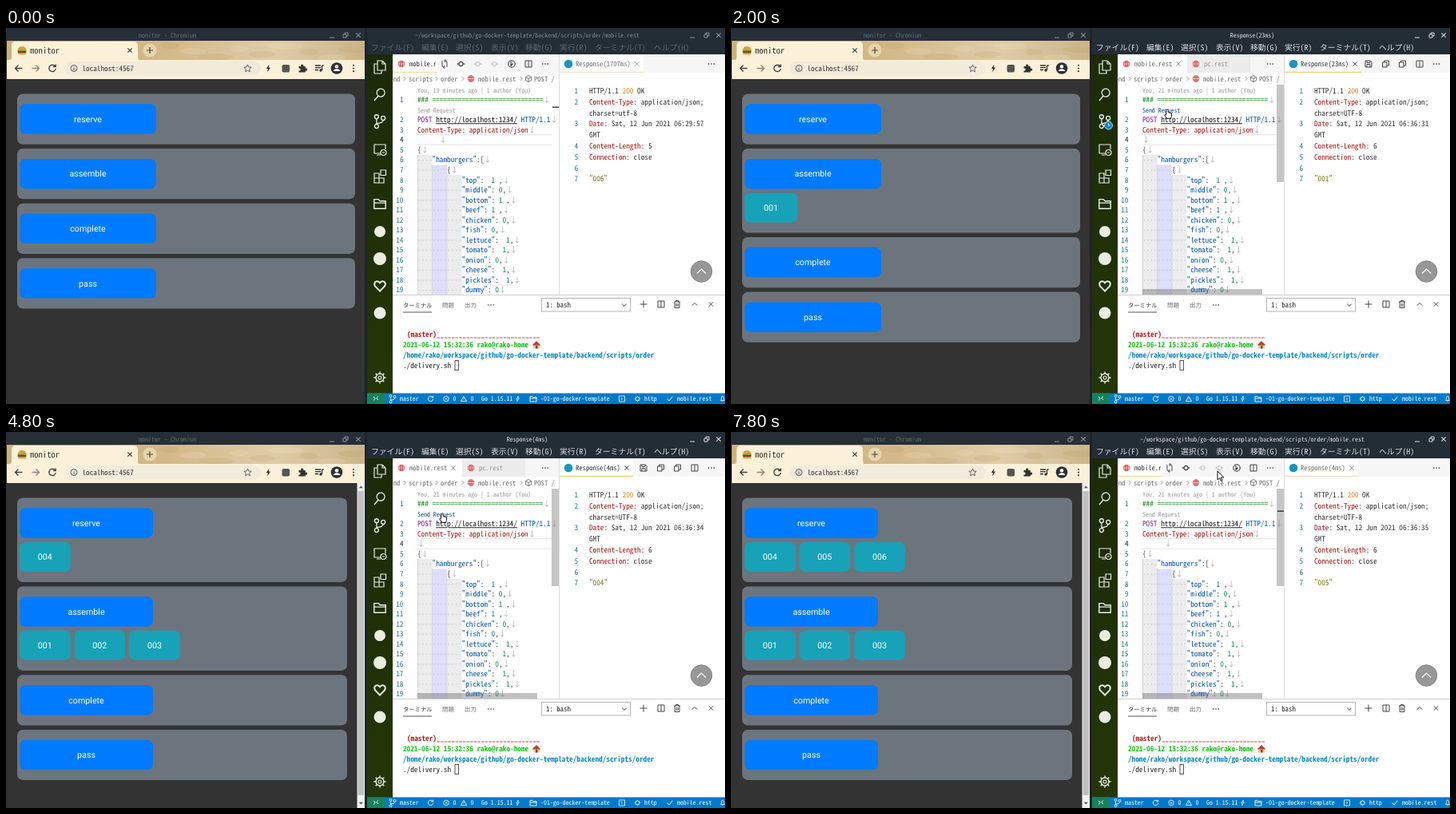
These frames come from a looping animation (900 by 471 pixels, 8 s). An HTML page:

```html
<!DOCTYPE html>
<html lang="ja">
<head>
<meta charset="utf-8">
<title>monitor</title>
<style>
html, body { margin: 0; width: 100%; height: 100%; overflow: hidden; background: #23262d; }
svg { display: block; width: 100vw; height: 100vh; }
text { white-space: pre; text-rendering: geometricPrecision;
  font-family: "Noto Sans Mono CJK JP", "Noto Sans Mono", "DejaVu Sans Mono", monospace; }
.cjk { font-family: "Noto Sans Mono CJK JP", "Noto Sans CJK JP", "Noto Sans CJK", sans-serif; }
.ui { font-family: Roboto, sans-serif; }
</style>
</head>
<body>
<svg viewBox="0 0 900 471" preserveAspectRatio="none">
  <defs>
    <linearGradient id="strip">
      <stop offset="0" stop-color="#cdb07c"/><stop offset=".45" stop-color="#d2b988"/>
      <stop offset=".75" stop-color="#dfcda8"/><stop offset="1" stop-color="#cbb58a"/>
    </linearGradient>
    <linearGradient id="olive" x2="0" y2="1">
      <stop offset="0" stop-color="#1c2b05"/><stop offset="1" stop-color="#243606"/>
    </linearGradient>
    <clipPath id="editorClip"><rect x="484" y="56" width="208" height="278"/></clipPath>
    <clipPath id="codeClip"><rect x="484" y="71" width="206" height="263"/></clipPath>
    <clipPath id="tabClip"><rect x="484" y="33" width="54" height="23"/></clipPath>
    <clipPath id="responseClip"><rect x="693" y="33" width="72" height="23"/></clipPath>
  </defs>
  <g id="base"></g>
  <g id="live"></g>
</svg>
<script>
const LOOP = 8000, STEP = 200;
const CODE = 4.63, SMALL = 3.95, TAB = 4.3;
const BLUE = '#0451a5', RED = '#a31515', GREY = '#6b6b6b', TEAL = '#237893';

// Font size is derived from the wanted column width of the monospaced face.
const pen = document.createElement('canvas').getContext('2d');
pen.font = '100px "Noto Sans Mono CJK JP", "Noto Sans Mono", "DejaVu Sans Mono", monospace';
const advance = pen.measureText('0').width / 100;

const text = (x, y, size, str, fill, extra = '') =>
  `<text x="${x}" y="${y + size * .36}" font-size="${size}" fill="${fill}" ${extra}>${str}</text>`;
const mono = (x, y, pitch, str, fill = '#222', extra = '') => text(x, y, pitch / advance, str, fill, extra);
const runs = (x, y, pitch, ...parts) =>
  mono(x, y, pitch, parts.map(([s, c, e = '']) => `<tspan fill="${c}" ${e}>${s}</tspan>`).join(''));
const cjk = (x, y, size, str, fill) => text(x, y, size, str, fill, 'class="cjk"');
const label = (x, y, str) => text(x, y, 10.7, str, '#fff', 'class="ui" text-anchor="middle"');
const rect = (x, y, w, h, fill, r = 0, extra = '') =>
  `<rect x="${x}" y="${y}" width="${w}" height="${h}" rx="${r}" fill="${fill}" ${extra}/>`;
const dot = (x, y, r, fill, extra = '') => `<circle cx="${x}" cy="${y}" r="${r}" fill="${fill}" ${extra}/>`;
const icon = (x, y, d, stroke = '#444', width = 1, fill = 'none') =>
  `<path transform="translate(${x} ${y})" d="${d}" stroke="${stroke}" stroke-width="${width}" fill="${fill}"/>`;
const clip = (id, body) => `<g clip-path="url(#${id})">${body}</g>`;

const D = {
  cross: 'M-2.7-2.7l5.4 5.4m0-5.4l-5.4 5.4',
  split: 'M-4-4h8v8h-8zM0-4v8',
  more: 'M-4 0h1.4m1.9 0h1.4m1.9 0h1.4',
  up: 'M-3.2 1.6L0-1.6 3.2 1.6',
  down: 'M-2.8-1.4L0 1.4 2.8-1.4',
  right: 'M-1.2-2.4l2.4 2.4-2.4 2.4',
  commit: 'M-5 0h2.4m5.2 0h2.4M-2.6 0a2.6 2.6 0 1 0 5.2 0a2.6 2.6 0 1 0-5.2 0',
  compare: 'M-3-4v6q0 2 2 2h2M3 4v-6q0-2-2-2h-2M0 2.3l-1.8 1.8 1.8 1.6M0-5.7l1.8 1.6L0-2.3',
  fork: 'M-4.2 0a4.2 4.2 0 1 0 8.4 0a4.2 4.2 0 1 0-8.4 0M-1-3v6m0-1l2.6-2.5',
  save: 'M-4-4h6.5l1.5 1.5v6.5h-8zM-2-4v2.5h4v-2.5M-2 4v-3.5h4v3.5',
  copy: 'M-4-2h5.5v6h-5.5zM-2-2v-2h6v6h-2.5',
  branch: 'M-2.5-1.8v4M2.5-1q0 2.4-5 2.6M-4-3.5a1.5 1.5 0 1 0 3 0a1.5 1.5 0 1 0-3 0M1-2.5a1.5 1.5 0 1 0 3 0a1.5 1.5 0 1 0-3 0M-4 3.7a1.5 1.5 0 1 0 3 0a1.5 1.5 0 1 0-3 0',
  folder: 'M-4-3h3l1 1.2h4v5.3h-8zM-4-.5h8',
  gear: 'M-3 0a3 3 0 1 0 6 0a3 3 0 1 0-6 0M0-4.6v1.6M0 3v1.6M-4.6 0h1.6M3 0h1.6M-3.2-3.2l1 1M2.2 2.2l1 1M-3.2 3.2l1-1M2.2-2.2l1-1',
  reload: 'M3.5-2.5a4.2 4.2 0 1 0 .7 3M4.2-5v3h-3',
  bolt: 'M1-5l-3.6 5.6h2.2l-1 4.4 3.8-6h-2.3z',
  cube: 'M0-4l3.6 2v4L0 4l-3.6-2v-4zM-3.6-2L0 0l3.6-2M0 0v4'
};
const globe = (x, y) => dot(x, y, 4.2, '#d33d3d') +
  icon(x, y, 'M-4 0h8M0-4v8M-2-3.4q-1.6 3.4 0 6.8M2-3.4q1.6 3.4 0 6.8', '#fff', .6);
const windowButtons = (a, b, c, color) => icon(a, 11, 'M-3 1h6', color) +
  icon(b, 9, 'M-3-1h4v4h-4zM-1-1v-2h4v4h-2', color) + icon(c, 9, D.cross, color, 1.1);

function browserBase() {
  let s = rect(0, 0, 450, 18, '#262f38') +
    mono(166, 9, 4, 'monitor - Chromium', '#606a76') + windowButtons(408, 425, 441, '#8a909a') +
    rect(1, 16, 448, 25, 'url(#strip)');
  for (let i = 0; i < 9; i++)
    s += `<ellipse cx="${205 + i * 29}" cy="${22 + i * 7 % 17}" rx="${12 + i % 3 * 5}" ry="4" fill="${i % 2 ? '#efe0c0' : '#b99a66'}" opacity=".2"/>`;
  s += `<path d="M3 41q4 0 4-5v-14q0-5 5-5h148q5 0 5 5v14q0 5 4 5z" fill="#fbf1d9"/>` +
    rect(1, 40, 448, 24, '#fbf1d9') +
    icon(20, 28, 'M-5-.5q0-4.5 5-4.5t5 4.5z', 'none', 0, '#e59a35') + rect(14.5, 27.3, 11, 1.8, '#6aa336') +
    rect(14.7, 29, 10.6, 2, '#7b3e1c') + rect(15, 31, 10, 2.2, '#e59a35', 1) +
    mono(30, 28, 5.3, 'monitor', '#333') + icon(155, 28, D.cross, '#333', 1.1) +
    dot(180, 28, 8.5, '#e8d4ac') + icon(180, 28, 'M-4 0h8M0-4v8', '#444', 1.2) +
    icon(16, 50.5, 'M4.5 0h-9m4-4l-4 4 4 4', '#444', 1.4) +
    icon(37, 50.5, 'M-4.5 0h9m-4-4l4 4-4 4', '#8d8779', 1.4) + icon(58, 50.5, D.reload, '#444', 1.4) +
    rect(73, 42, 246, 17.5, '#f2ebdc', 8.7) +
    dot(85, 50.5, 4, 'none', 'stroke="#555"') + icon(85, 50.5, 'M0-2.2v1M0-.4v2.8', '#555') +
    mono(95.5, 50.5, 4.6, 'localhost:4567', '#333') +
    icon(302.5, 50.5, 'M0-4.6l1.3 3.1 3.3.3-2.5 2.2.8 3.3L0 2.6l-2.9 1.7.8-3.3-2.5-2.2 3.3-.3z', '#555', .9) +
    icon(328.5, 50.5, D.bolt, 'none', 0, '#222') + rect(345.5, 46, 9.5, 9.5, '#555', 2) +
    icon(371, 50.5, 'M-4.5-2.5h2.7a1.7 1.7 0 1 1 3 0h2.6v2.8a1.6 1.6 0 1 1 0 2.8v2h-8.3v-2.3a1.5 1.5 0 1 0 0-2.7z', 'none', 0, '#333') +
    icon(392, 50.5, 'M-5-3.5h7M-5-.8h7M-5 2h4M3.5-3.5v6M3.5-3.5h2.2', '#333', 1.3) + dot(394, 53, 1.7, '#333') +
    dot(414, 50.5, 7.3, '#2d3036') + dot(414, 48.2, 2.2, '#fff') + icon(414, 54, 'M-4 0q0-2.7 4-2.7t4 2.7z', 'none', 0, '#fff') +
    [46.8, 50.5, 54.2].map(y => dot(435, y, 1.1, '#444')).join('') +
    rect(0, 64, 449, 407, '#333');
  return s + rect(449, 0, 3, 471, '#202329');
}

function activityBar() {
  const w = '#e9ede0', x = 468;
  return rect(452, 33, 32, 425, 'url(#olive)') +
    icon(x, 49, 'M-3-8h6l4 4v8h-10zM3-8v4h4M-3-4h-4v12h9v-4', w, 1.2) +
    icon(x, 83, 'M-2 2a5 5 0 1 1 4 1a5 5 0 0 1-4-1l-5 6', w, 1.3) +
    `<g transform="translate(${x} 117) scale(1.65)">${icon(0, 0, D.branch, w, .8)}</g>` +
    icon(x, 152, 'M1 5h-8v-11h14v6M-4 7h5M1 4a3.5 3.5 0 1 0 7 0a3.5 3.5 0 1 0-7 0M3 4h3', w, 1.2) +
    icon(x, 186, 'M-7-4h6v12h-6zM-1 2h6v6h-12v-6zM1-8h6.5v6.5h-6.5z', w, 1.2) +
    `<g transform="translate(${x} 220) scale(1.8)">${icon(0, 0, D.folder, w, .8)}</g>` +
    dot(x, 255, 7, w) + dot(x, 289, 8, w) +
    icon(x, 323, 'M0 6.5l-6-6q-2-4 1-5.8q3-1.4 5 1.6q2-3 5-1.6q3 1.8 1 5.8z', w, 2) +
    dot(x, 357, 7.5, w) +
    `<g transform="translate(${x} 438) scale(1.65)">${icon(0, 0, D.gear, w, .9)}${dot(0, 0, 1.2, 'none', `stroke="${w}" stroke-width=".7"`)}</g>`;
}

const row = n => 115 + 12.53 * (n - 2);

function code() {
  const items = ['top:  1 ,', 'middle: 0,', 'bottom: 1 ,', 'beef: 1 ,', 'chicken: 0,', 'fish: 0,', 'lettuce:  1,',
    'tomato:  1,', 'onion: 0,', 'cheese:  1,', 'pickles:  1,', 'dummy: 0'];
  const end = ['↓', '#aaa'], x = 515, ink = '#333';
  const indented = (n, columns, ...parts) =>
    `<path d="M${x + 1.8} ${row(n) + .5}h${CODE * columns - 2}" stroke="#b9b9b9" stroke-dasharray="1 ${CODE - 1}"/>` +
    runs(x + CODE * columns, row(n), CODE, ...parts, end);
  let s = rect(x, 159, 18.5, 175, '#ececec') + rect(533.5, 171.5, 18.5, 163, '#dedefb') + rect(552, 184, 18.5, 150, '#ececec') +
    icon(0, 0, 'M515.5 159v175M533.5 171v163M552 184v150', '#cfcfd6', .7) +
    icon(0, 0, 'M515 133.7h168M515 146.3h168', '#e4e4e4', 1);
  for (let n = 1; n < 20; n++)
    s += mono(497.5, n == 1 ? 90 : row(n), CODE, n, n == 4 ? '#0b216f' : TEAL, 'text-anchor="end"');
  s += runs(x, 90, CODE, ['### ' + '='.repeat(30), '#008000'], end) +
    runs(x, row(2), CODE, ['POST ', '#8b1a9b'], ['http://localhost:1234/', '#111', 'text-decoration="underline"'], [' HTTP/1.1', BLUE], end) +
    runs(x, row(3), CODE, ['Content-Type: application/json', RED], end) +
    indented(5, 0, ['{', '#555']) +
    indented(6, 4, ['"hamburgers"', BLUE], [':[', ink]) +
    indented(7, 8, ['{', ink]);
  items.forEach((item, i) => {
    const [, key, mid, digit, tail] = item.match(/(\w+)(: +)(\d)(.*)/);
    s += indented(8 + i, 12, [`"${key}"`, BLUE], [mid, ink], [digit, '#098658'], [tail, ink]);
  });
  return clip('codeClip', s);
}

function panel() {
  const home = '/home/rako/workspace/github/go-docker-template/backend/scripts/order';
  const bold = 'font-weight="700"';
  return rect(484, 334, 416, 124, '#fff') + icon(0, 0, 'M484 334.5h416', '#d0d0d0') +
    cjk(497, 347, 7.3, 'ターミナル', '#333') + icon(0, 0, 'M497 356h36', '#555') +
    cjk(546, 347, 7.5, '問題', GREY) + cjk(574, 347, 7.5, '出力', GREY) + icon(607, 347, D.more, '#555', 1.3) +
    rect(670.5, 338.5, 111, 16.5, '#fff', 0, 'stroke="#b4b4b4"') + mono(676, 347, 4.4, '1: bash') +
    icon(774, 347, D.down) + icon(798, 346, 'M-4.5 0h9M0-4.5v9') + icon(820, 346, D.split) +
    icon(840, 346, 'M-4-3h8M-1.5-3v-1.5h3v1.5M-3-3v7.5h6v-7.5M-1-1v4M1-1v4') + icon(862, 346, D.up) + icon(882.5, 346, D.cross) +
    mono(502, 383.5, CODE, '(master)' + '_'.repeat(28), '#b32020', bold) +
    mono(497, 396.8, CODE, '2021-06-12 15:32:36 rako@rako-home', '#18c418', bold) +
    rect(660, 396.5, 8, 5, '#e6c79a') + icon(664, 396, 'M-5.5 1.5L0-4 5.5 1.5z', 'none', 0, '#b5442f') + rect(663, 398, 2.5, 3.5, '#7a4a28') +
    mono(497, 409.8, CODE, home, '#0c8ac2', bold) +
    mono(497, 422.7, CODE, './delivery.sh') + rect(562, 416.5, 4.5, 12, 'none', 0, 'stroke="#555"');
}

function statusBar() {
  const y = 464.5, w = '#fff';
  const say = (x, str) => mono(x, y - .3, SMALL, str, w);
  return rect(452, 457.5, 448, 13.5, '#007acc') + rect(452, 457.5, 22, 13.5, '#16825d') +
    icon(463, y, 'M-3-2.5l2.3 2.2-2.3 2.2M3-3L.7-.8 3 1.4', w, .9) + icon(484, y, D.branch, w, .9) + say(493, 'master') +
    `<g transform="translate(531.5 ${y}) scale(.75)">${icon(0, 0, D.reload, w, 1.2)}</g>` +
    dot(551, y, 3.3, 'none', `stroke="${w}" stroke-width=".8"`) + icon(551, y, 'M-1.3-1.3l2.6 2.6m0-2.6l-2.6 2.6', w, .8) + say(559.5, '0') +
    icon(573, y, 'M0-3.3L3.6 3h-7.2zM0-1v2', w, .8) + say(581.5, '0') + say(595, 'Go 1.15.11') +
    icon(640.5, y, 'M.8-3.5l-2.6 4h1.6l-.7 3 2.7-4.2h-1.6z', w, .7) + icon(660, y, D.folder, w, .9) + say(669, '-01-go-docker-template') +
    icon(771, y, 'M-3.5-3.5h7v7h-7zM-1-1.6l1.6 1.6L-1 1.6', w, .8) +
    `<g transform="translate(790.5 ${y}) scale(.8)">${icon(0, 0, D.gear, w, 1)}</g>` + say(799, 'http') +
    icon(831, y, 'M-3.3 0l2.3 2.6 4.3-5.4', w, 1) + say(840, 'mobile.rest') +
    icon(897, y, 'M-2.5 2h5q-1-1-1-3q0-2.4-1.5-2.4t-1.5 2.4q0 2-1 3zM-.6 3.2h1.2', w, .8);
}

function editorBase() {
  return rect(452, 0, 448, 33, '#232d36') + rect(484, 33, 416, 302, '#fff') +
    clip('editorClip', mono(480.5, 63.5, TAB, 'end', GREY) +
      [499, 539, 572, 645].map(x => icon(x, 63.5, D.right, '#777', .8)).join('') +
      mono(504, 63.5, TAB, 'scripts', GREY) + mono(544, 63.5, TAB, 'order', GREY) + globe(582, 63.5) +
      mono(591, 63.5, TAB, 'mobile.rest', GREY) + icon(654, 63.5, D.cube, '#555', .8) + mono(661, 63.5, TAB, 'POST /', GREY)) +
    code() + dot(870.5, 305, 13.3, '#979797', 'stroke="#868686"') + icon(870.5, 305, 'M-5.5 2.5L0-3l5.5 5.5', '#fff', 1.2) +
    activityBar() + panel() + statusBar();
}

function monitor(orders) {
  const tight = orders > 3;
  const [cardW, buttonW, chipW, gap] = tight ? [413, 167, 63.5, 68.6] : [423, 171, 66, 70];
  const all = Array.from({ length: orders }, (_, i) => '00' + (i + 1));
  const chips = { reserve: all.slice(3), assemble: all.slice(0, 3), complete: [], pass: [] };
  let y = 82.5, s = '';
  for (const [name, ids] of Object.entries(chips)) {
    const h = ids.length ? 105.5 : 63.2;
    s += rect(14, y, cardW, h, '#6c757d', 7) + rect(17, y + 12.8, buttonW, 37.5, '#007bff', 7) +
      label(17 + buttonW / 2, y + 31.4, name);
    ids.forEach((id, i) => {
      s += rect(17 + gap * i, y + 55.4, chipW, 37, '#17a2b8', 7) + label(17 + gap * i + chipW / 2, y + 73.8, id);
    });
    y += h + 5.4;
  }
  if (tight) s += rect(439.5, 64, 9.5, 407, '#f1f1f1') + rect(440.5, 74, 7.5, 381, '#c1c1c1') +
    icon(444.3, 69, 'M-2.5 1.3L0-1.4l2.5 2.7z', 'none', 0, '#555') + icon(444.3, 465, 'M-2.5-1.3L0 1.4l2.5-2.7z', 'none', 0, '#555');
  return s;
}

function header(title, focused) {
  const color = focused ? '#d9dce2' : '#5c6670';
  const menu = [[457, 'ファイル(F)'], [520, '編集(E)'], [563, '選択(S)'], [607, '表示(V)'], [650, '移動(G)'],
    [693, '実行(R)'], [737, 'ターミナル(T)'], [811, 'ヘルプ(H)']];
  return mono(652.5, 9, 3.96, title, focused ? color : '#7d8792', 'text-anchor="middle"') +
    windowButtons(859, 877, 892, focused ? color : '#8a909a') +
    menu.map(([x, s]) => cjk(x, 24.5, 9.8, s, color)).join('');
}

const gitTools = (x, y = 45) => icon(x, y, D.commit, '#333', 1.2) + icon(x + 21, y, D.commit, '#bbb') +
  icon(x + 42, y, D.commit, '#bbb') + icon(x + 63.5, y, D.fork, '#333', 1.1);

function tabs(mode, response) {
  const y = 45, editing = mode == 'edit';
  const labelEnd = 713 + response.length * TAB;
  let s = rect(484, 33, 416, 23, '#f6f6f6');
  if (editing) {
    s += rect(484, 33, 56, 23, '#fff') + clip('tabClip', globe(495, y) + mono(505, y, TAB, 'mobile.rest', '#333')) +
      icon(549, y, D.compare) + gitTools(569.5) + icon(654, y, D.split) + icon(0, 0, 'M484 55.3h56', '#f0d48a');
  } else {
    s += rect(484, 33, 87, 23, '#fff') + rect(571, 33, 79, 23, '#ececec') + globe(495, y) + mono(505, y, TAB, 'mobile.rest', GREY) +
      icon(560, y, D.cross, '#999') + globe(582, y) + mono(592, y, TAB, 'pc.rest', '#999');
  }
  s += icon(675, y, D.more, '#444', 1.3);
  const tabW = mode == 'git' ? 73 : labelEnd + 16 - 692;
  s += rect(692, 33, tabW, 23, '#fff') + dot(704, y, 5.3, '#1697bd') +
    (mode == 'git' ? clip('responseClip', mono(713, y, TAB, response, '#333')) : mono(713, y, TAB, response, editing ? GREY : '#333'));
  if (mode != 'git') s += icon(labelEnd + 8, y, D.cross, editing ? '#999' : '#444');
  s += icon(0, 0, `M692 55.3h${tabW}`, editing ? '#f0dca8' : '#ecc04f');
  if (!editing) {
    s += icon(862, y, D.split);
    s += mode == 'git' ? gitTools(777) : icon(798, y, D.save) + icon(819.5, y, D.copy) + icon(840.5, y, D.copy);
  }
  return s + icon(883, y, D.more, '#444', 1.3) + icon(0, 0, 'M692.5 33v301', '#dcdcdc');
}

function reply(stamp, size, body, charset) {
  const x = 730, at = i => 78.7 + 13.8 * i, ink = '#333';
  const field = (i, name, value) => runs(x, at(i), CODE, [name, RED], [': ' + value, ink]);
  return [0, 1, 3, 5, 6, 7, 8].map((line, i) => mono(716, at(line), CODE, i + 1, TEAL, 'text-anchor="end"')).join('') +
    runs(x, at(0), CODE, ['HTTP/1.1 ', ink], ['200', '#d08a1c'], [' OK', ink]) +
    field(1, 'Content-Type', 'application/json;') + mono(x, at(2), CODE, 'charset=' + charset, ink) +
    field(3, 'Date', 'Sat, 12 Jun 2021 ' + stamp) + mono(x, at(4), CODE, 'GMT', ink) +
    field(5, 'Content-Length', size) + field(6, 'Connection', 'close') + mono(x, at(8), CODE, `"${body}"`, '#737300');
}

function pointer(t) {
  const glide = (from, to, x0, y0, x1, y1) => {
    const p = Math.min(1, (t - from) / (to - from)), e = p * p * (3 - 2 * p);
    return icon(x0 + (x1 - x0) * e, y0 + (y1 - y0) * e, 'M0 0v11l2.6-2.4 1.8 4 1.7-.8-1.8-3.8h3.5z', '#111', 1, '#fff');
  };
  if (t < 600) return '';
  if (t < 1000) return glide(600, 1000, 470, 200, 547, 103);
  if (t < 7000) return icon(547, 107, 'M-1.6-4.5q1-1.6 2 0v3.2l4.2 1v3.6l-1 3h-5l-2.8-4.2q0-1.6 1.6-.6z', '#111', 1, '#fff');
  return glide(6800, 7600, 547, 103, 609, 49);
}

const arrivals = [1800, 2800, 3800, 4600, 5400, 6800];
const replies = [['06:29:57', 1707, '006'], ['06:36:31', 23, '001'], ['06:36:32', 31, '002'],
  ['06:36:33', 5, '003'], ['06:36:34', 4, '004'], ['06:36:35', 4, '005']];

function scene(t) {
  const orders = arrivals.filter(a => t >= a).length;
  const [stamp, ms, body] = replies[Math.min(orders, 5)];
  const first = orders == 0, focused = t >= 800, hover = t >= 1000 && t < 7000;
  const mode = first || t >= 6600 ? 'edit' : t >= 5400 ? 'git' : 'reply';
  const response = `Response(${ms}ms)`;
  const title = mode == 'edit' ? '~/workspace/github/go-docker-template/backend/scripts/order/mobile.rest' : response;
  let s = monitor(orders) + header(title, focused) + tabs(mode, response) +
    reply(stamp, first ? 5 : 6, body, first ? 'utf-8' : 'UTF-8') +
    mono(515, 77.8, SMALL, `You, ${first ? 19 : 21} minutes ago | 1 author (You)`, '#999') +
    mono(515, 103, SMALL, 'Send Request', hover ? '#0a4a9b' : '#999') +
    mono(mode == 'edit' ? 542.5 : 515, row(4), CODE, '↓', '#aaa');
  if (focused) s += rect(683, 71, 9, 122, '#646464', 0, 'opacity=".37"') + rect(515, 327, 150, 7, '#646464', 0, 'opacity=".4"');
  if (t < 1000 || t >= 5400) s += rect(684, 98.5, 8, 1.4, '#333');
  if (focused && first) s += rect(515, 134, 1.3, 12, '#111');
  if (t >= 1800 && t < 2600) s += dot(472.5, 122, 5, '#0a84d6', 'stroke="#fff" stroke-width=".7"') + icon(472.5, 122, 'M0-2.6v2.6h2', '#fff', .9);
  return s + pointer(t);
}

const live = document.getElementById('live');
document.getElementById('base').innerHTML = browserBase() + editorBase();
let shown = -1;
function draw() {
  const t = Math.floor(performance.now() % LOOP / STEP) * STEP;
  if (t !== shown) live.innerHTML = scene(shown = t);
  requestAnimationFrame(draw);
}
draw();
</script>
</body>
</html>
```
